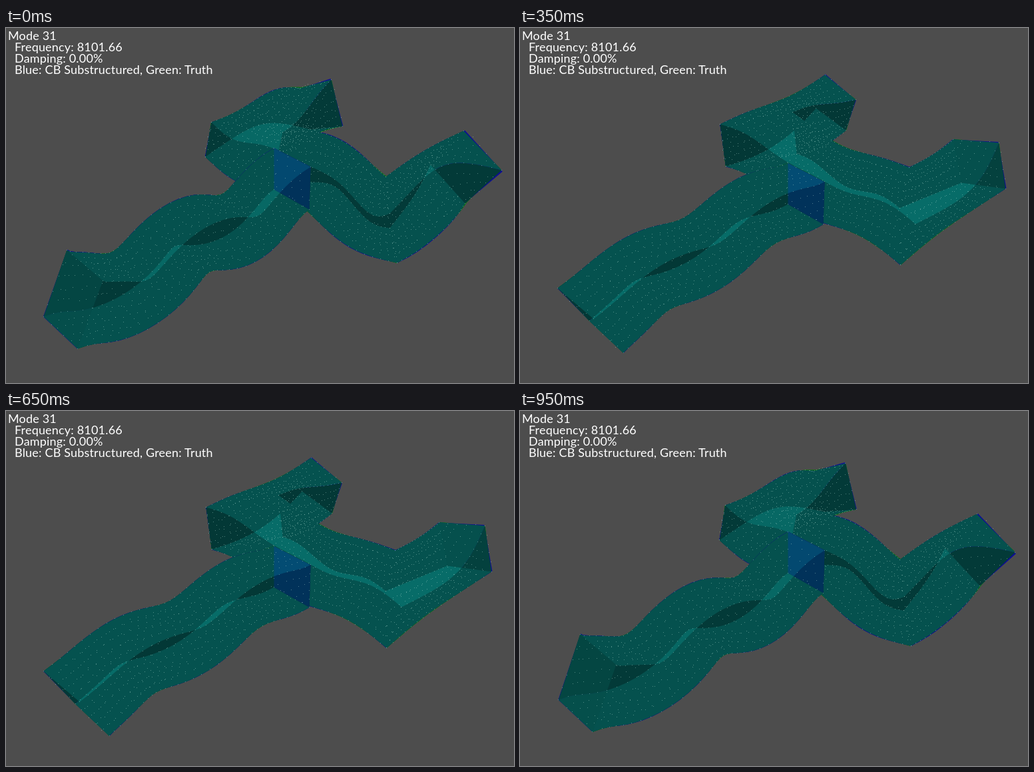
Animation, 763 px wide and 533 px high, one loop 1 s. Source, as an HTML page with a canvas:

```html
<!DOCTYPE html>
<html lang="en">
<head>
<meta charset="utf-8">
<title>Mode 31</title>
<style>
  html, body { margin: 0; width: 100%; height: 100%; overflow: hidden; background: #4d4d4d; }
  canvas, svg { position: absolute; left: 0; top: 0; }
  text { font: 18px Lato, "Open Sans", sans-serif; letter-spacing: .18px; fill: #fff; }
</style>
</head>
<body>
<canvas id="stage" width="763" height="533"></canvas>
<svg width="763" height="533">
  <text x="3" y="18">Mode 31</text>
  <text x="13" y="35">Frequency: 8101.66</text>
  <text x="13" y="52">Damping: 0.00%</text>
  <text x="13" y="69">Blue: CB Substructured, Green: Truth</text>
</svg>
<script>
const ctx = document.getElementById('stage').getContext('2d');
const { PI, sin, cos, exp, abs, round } = Math;
const LOOP = 1000, STEP = 50, SAMPLES = 36;
const EDGES = ['to', 'ti', 'bi', 'bo']; // top/bottom, outer/inner

const mix = (a, b, s) => a + (b - a) * s;
const modes = (amps, s) => amps.reduce((sum, a, i) => sum + a * sin((i + 1) * PI * s), 0);

// Joins corners [x, y, dx, dy]; sine modes bend the edge between them.
const bent = (p, q, ax, ay) => (s, k) => [
  mix(p[0], q[0], s) + k * (mix(p[2], q[2], s) + modes(ax, s)),
  mix(p[1], q[1], s) + k * (mix(p[3], q[3], s) + modes(ay, s))
];

// Two full waves from free tip to root: a swing across, a sway along, a kick at the tip.
const waved = (p, q, sway, kick) => (s, k) => {
  const phase = 4 * PI * (s - .027 * sin(PI * s));
  const u = mix(sway[0], sway[1], s) * sin(phase);
  const slope = (q[1] - p[1]) / (q[0] - p[0]);
  const free = exp(-s / .06);
  return [
    mix(p[0], q[0], s) + k * (u + kick[0] * free),
    mix(p[1], q[1], s) + k * (u * slope - 14 * cos(phase) + kick[1] * free)
  ];
};

function part(n, makeEdge) {
  const m = { n };
  for (const key of EDGES) m[key] = makeEdge(key);
  m.faces = EDGES.map((key, i) => [m[key], m[EDGES[(i + 1) % 4]]]);
  return m;
}

const end1 = { to: [452, 77, -10, 12.5], ti: [498, 96, -10, -19], bi: [495, 151, 10, -4], bo: [449, 132, 8, 20] };
const cor1 = { to: [303, 143, 5, -2], ti: [411, 137, 4, 19], bi: [411, 195, -7, 11], bo: [305, 202, -6, -9] };
const cor2 = { to: [587, 288, -11, -10], ti: [579, 214, -9, 9], bi: [572, 281, 4, 19], bo: [577, 354, 10, -2] };
const end2 = { to: [728, 187, 16, 26], ti: [664, 162, 23, -8], bi: [653, 222, -16, -17], bo: [714, 249, -25, 14] };

const bar = (n, p, q, bend) => part(n, key => bent(p[key], q[key], ...bend[key]));
const arm1 = bar(18, cor1, end1, {
  to: [[3], [-10, 5]], ti: [[], [5, 3]], bi: [[3], [-14]], bo: [[1, 3], [-27]]
});
const cross = bar(26, cor1, cor2, {
  to: [[6, -6], [-1, -5, 10, -2, 5]], ti: [[11, -6], [-19, -6, 2]],
  bi: [[4, 2], [-6, -1, 9]], bo: [[-4, 4], [1, -3, 11, 3]]
});
const arm2 = bar(16, cor2, end2, {
  to: [[-15, 4], [-34, 3]], ti: [[-2], [-4]], bi: [[7], [-3]], bo: [[11, -4], [2, 4]]
});

const tip = { to: [69, 369], ti: [123, 415], bi: [137, 485], bo: [86, 437] };
const root = { to: [402, 194], ti: [457, 222], bi: [455, 286], bo: [402, 256] };
const beam = part(32, key => key[0] === 't'
  ? waved(tip[key], root[key], [11, 11], [22, -22])
  : waved(tip[key], root[key], [-21, -5], [-30, 10]));
const frame = [arm1, cross, arm2];

const trace = (e, k) => Array.from({ length: SAMPLES + 1 }, (_, i) => e(i / SAMPLES, k));
const ring = (e, f, k) => [...trace(e, k), ...trace(f, k).reverse()];
const section = (m, s, k) => EDGES.map(key => m[key](s, k));

function fill(pts, color, mode = 'source-over') {
  ctx.globalCompositeOperation = mode;
  ctx.fillStyle = color;
  ctx.beginPath();
  for (const [x, y] of pts) ctx.lineTo(x + .5, y + .5);
  ctx.fill();
  ctx.globalCompositeOperation = 'source-over';
}

function shell(parts, k, color) {
  for (const m of parts) for (const [e, f] of m.faces) fill(ring(e, f, k), color);
}

// The two models differ slightly in amplitude, which shows as thin rims.
function fringe(parts, k, more) {
  shell(parts, k * (1 - more), '#0a7d0a');
  shell(parts, k * (1 + more), '#0c0c96');
}

function cap(m, s, k, alpha) {
  if (alpha > 0) fill(section(m, s, k), `rgba(5,78,74,${alpha})`);
}

function randomizer(seed) {
  return () => (seed = seed * 16807 % 2147483647) / 2147483647 - .5;
}

function dots(m, k) {
  const rand = randomizer(31), rough = 5 * k;
  ctx.fillStyle = 'rgba(170,215,205,.45)';
  for (const [e, f] of m.faces) {
    for (let i = 0; i <= m.n; i++) {
      const a = e(i / m.n, k), b = f(i / m.n, k);
      for (let j = 0; j < 5; j++) {
        const jx = j && rough * rand(), jy = j && rough * rand();
        ctx.fillRect(round(mix(a[0], b[0], j / 5) + jx), round(mix(a[1], b[1], j / 5) + jy), 1, 1);
      }
    }
  }
}

function draw(k) {
  const bend = abs(k);
  const dark = `rgb(3,${52 + 6 * bend},${50 + 6 * bend})`;
  const light = `rgb(2,${31 - 8 * bend},${30 - 8 * bend})`;
  const glow = pts => fill(pts, light, 'lighter');
  const chain = (key, ...parts) => parts.flatMap(m => trace(m[key], k));
  const rim = key => [...trace(arm1[key], k).reverse(), ...chain(key, cross, arm2)];

  ctx.fillStyle = '#4d4d4d';
  ctx.fillRect(0, 0, 763, 533);

  fringe(frame, k, .08);
  shell(frame, k, dark);
  glow(ring(arm1.bi, arm1.bo, k));
  fill(ring(cross.ti, cross.bi, k), dark);
  glow([...chain('bo', cross, arm2), ...chain('bi', cross, arm2).reverse()]);
  glow([...rim('to'), ...rim('ti').reverse()]);
  cap(arm2, 1, k, -.7 * k);
  frame.forEach(m => dots(m, k));

  fringe([beam], k, .02);
  shell([beam], k, dark);
  glow(ring(beam.bi, beam.bo, k));
  fill(section(beam, 1, k), 'rgb(1,50,90)');
  glow(ring(beam.to, beam.ti, k));
  cap(beam, 0, k, .65 * k);
  dots(beam, k);
}

let last = -1;
function tick(now) {
  const step = Math.floor((now % LOOP) / STEP);
  if (step !== last) {
    last = step;
    draw(cos(2 * PI * step * STEP / LOOP));
  }
  requestAnimationFrame(tick);
}
tick(performance.now());
</script>
</body>
</html>
```
